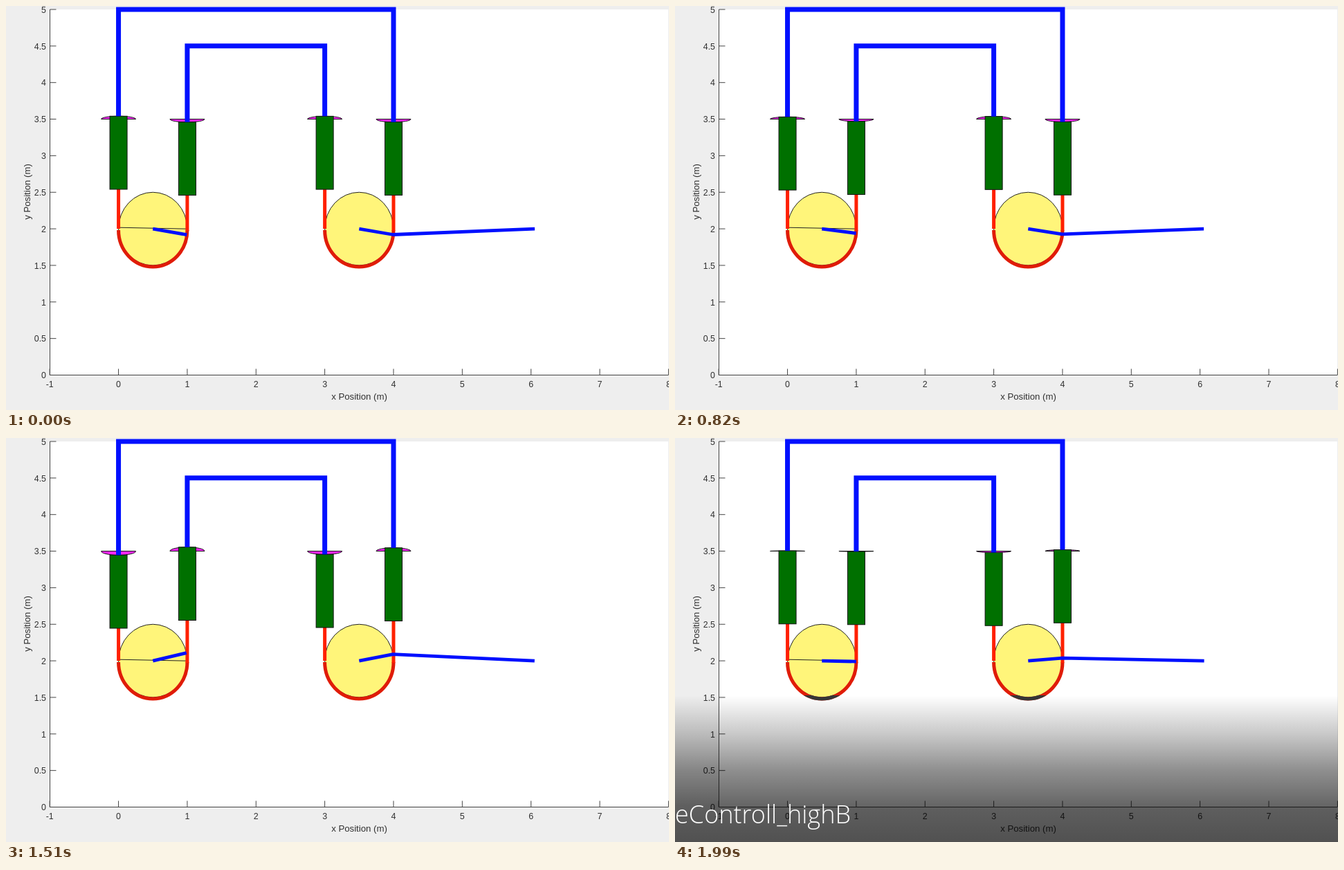
Recreate the animation shown at these times as an HTML page. Size 958x584 px, loop 2.65 s.

```html
<!DOCTYPE html>
<html lang="en">
<head>
<meta charset="utf-8">
<title>Coupled pulleys</title>
<style>
  html, body { margin: 0; width: 100%; height: 100%; overflow: hidden; background: #eee; }
  svg { display: block; width: 958px; height: 584px; }
  text { font-family: "Liberation Sans", Arial, sans-serif; fill: #303030; }
  .tick { font-size: 12.4px; }
  .label { font-size: 13.2px; text-anchor: middle; }
  .title { font: 300 36px "Open Sans", "Noto Sans", sans-serif; fill: #fff; text-anchor: end; }
</style>
</head>
<body>
<svg id="stage" viewBox="0 0 958 584" xmlns="http://www.w3.org/2000/svg">
  <defs>
    <linearGradient id="shade" x1="0" y1="0" x2="0" y2="1">
      <stop offset="0" stop-color="#000" stop-opacity="0"/>
      <stop offset=".27" stop-color="#000" stop-opacity=".22"/>
      <stop offset=".51" stop-color="#000" stop-opacity=".44"/>
      <stop offset=".75" stop-color="#000" stop-opacity=".6"/>
      <stop offset="1" stop-color="#000" stop-opacity=".66"/>
    </linearGradient>
    <clipPath id="lower"><rect y="372" width="958" height="212"/></clipPath>
  </defs>
  <rect width="958" height="584" fill="#eee"/>
  <rect x="63.5" y="5" width="893.5" height="528.5" fill="#fff"/>
  <g id="axes" stroke="#444" fill="none"></g>
  <g id="machine" fill="none"></g>
  <g id="overlay">
    <rect y="372" width="958" height="212" fill="url(#shade)"/>
    <text class="title" x="254" y="557">eControll_highB</text>
  </g>
  <g id="darkArcs" clip-path="url(#lower)" fill="none"></g>
</svg>
<script>
const LOOP = 2650, UX = 99.35, UY = 105.7;
const X = x => 63.2 + (x + 1) * UX;
const Y = y => 533.5 - y * UY;
const BLUE = '#0010ff', RED = '#ff2000';
const CABLE_Y = Y(3.5), AXLE_Y = Y(2), RX = UX / 2, RY = UY / 2;
const ROD = Math.sqrt(4.25);
const byId = id => document.getElementById(id);

function add(parent, tag, attrs, text) {
  const el = document.createElementNS('http://www.w3.org/2000/svg', tag);
  set(el, attrs);
  if (text !== undefined) el.textContent = text;
  parent.appendChild(el);
  return el;
}
function set(el, attrs) {
  for (const k in attrs) el.setAttribute(k, attrs[k]);
}

function buildAxes() {
  const axes = byId('axes');
  const label = (attrs, text) => add(axes, 'text', { stroke: 'none', ...attrs }, text);
  add(axes, 'path', { d: 'M63.5 5V533.5H957' });
  for (let x = -1; x <= 8; x++) {
    add(axes, 'path', { d: `M${X(x)} 533.5v-9` });
    label({ class: 'tick', x: X(x), y: 551, 'text-anchor': 'middle' }, x);
  }
  for (let y = 0; y <= 5; y += 0.5) {
    add(axes, 'path', { d: `M63.5 ${Y(y)}h9` });
    label({ class: 'tick', x: 58, y: Y(y) + 4.7, 'text-anchor': 'end' }, y);
  }
  label({ class: 'label', x: 510.5, y: 568.5 }, 'x Position (m)');
  label({ class: 'label', transform: 'translate(35 268.5) rotate(-90)' }, 'y Position (m)');
}

const machine = byId('machine');
const arc = (x, dx, y) => `M${x} ${y}A${RX} ${RY} 0 0 0 ${x + dx} ${y}`;

// One cable end: dome, sliding block and the cord below it.
function makePost(x) {
  const cx = X(x);
  return {
    cx,
    dome: add(machine, 'path', { fill: '#ff28ff', stroke: '#111', 'stroke-width': 1 }),
    cord: add(machine, 'path', { stroke: RED, 'stroke-width': 5 }),
    block: add(machine, 'rect', { x: cx - 12.5, width: 25, height: UY, fill: '#007000', stroke: '#111' })
  };
}
function makePulley(x, chord) {
  const cx = X(x + 0.5), left = X(x);
  add(machine, 'ellipse', { cx, cy: AXLE_Y, rx: RX, ry: RY, fill: '#fff57a', stroke: '#222' });
  if (chord) add(machine, 'path', { d: `M${left} 320.2L${left + UX} 322.2`, stroke: '#222' });
  add(machine, 'path', { d: arc(left, UX, AXLE_Y + 2), stroke: '#e01c08', 'stroke-width': 5 });
  add(byId('darkArcs'), 'path', { d: arc(left, UX, AXLE_Y + 2), stroke: '#363636', 'stroke-width': 5 });
  return { cx, posts: [makePost(x), makePost(x + 1)] };
}

buildAxes();
const pulleys = [makePulley(0, true), makePulley(3, false)];
const pipe = () => add(machine, 'path', { stroke: BLUE, 'stroke-width': 7 });
const pipes = [pipe(), pipe()];
const arm = () => add(machine, 'path', { stroke: BLUE, 'stroke-width': 4.8, 'stroke-linejoin': 'round' });
const arms = [arm(), arm()];

// Lift of each crank tip in pixels, at a few moments.
const TIMES = [0, 250, 600, 1090, 1510, 1650];
const LIFTS = [
  [-8.6, 26, -8, 3.5, 11.5, -1],
  [-8.4, 22, -7.6, -1, 9.5, 4]
];

// Smooth curve through the given moments.
function curve(values, t) {
  const last = TIMES.length - 1;
  if (t >= TIMES[last]) return values[last];
  const i = TIMES.findIndex(k => k > t) - 1;
  const slope = k => k === 0 || k === last ? 0
    : (values[k + 1] - values[k - 1]) / (TIMES[k + 1] - TIMES[k - 1]);
  const span = TIMES[i + 1] - TIMES[i], s = (t - TIMES[i]) / span;
  const s2 = s * s, s3 = s2 * s;
  return values[i] * (2 * s3 - 3 * s2 + 1) + values[i + 1] * (3 * s2 - 2 * s3)
    + span * (slope(i) * (s3 - 2 * s2 + s) + slope(i + 1) * (s3 - s2));
}

const STEPS = 30;
const stepTime = i => 70 * i - (i >= 4 ? 30 : 0) - (i >= 27 ? 10 : 0);

function posePulley(pulley, lift) {
  pulley.posts.forEach((post, side) => {
    const drop = (side ? -lift : lift) / 2, top = CABLE_Y + drop, { cx } = post;
    set(post.dome, { d: `M${cx - 25} ${CABLE_Y}A25 ${Math.max(Math.abs(drop), 0.01)} 0 0 ${drop > 0 ? 0 : 1} ${cx + 25} ${CABLE_Y}Z` });
    set(post.block, { y: top });
    set(post.cord, { d: `M${cx} ${top + UY}V${AXLE_Y + (side ? 3 : 0)}` });
    post.top = top;
  });
}

function draw(ms) {
  const now = ms % LOOP;
  let step = STEPS - 1;
  while (step > 0 && stepTime(step) > now) step--;
  const t = stepTime(step);

  pulleys.forEach((pulley, i) => {
    const lift = curve(LIFTS[i], t), sin = lift / RY;
    posePulley(pulley, lift);
    const tipX = pulley.cx + RX * Math.sqrt(1 - sin * sin);
    let d = `M${pulley.cx} ${AXLE_Y}L${tipX} ${AXLE_Y - lift}`;
    if (i === 1) d += `L${tipX + UX * Math.sqrt(ROD * ROD - (sin / 2) ** 2)} ${AXLE_Y}`;
    set(arms[i], { d });
  });

  const [a, b] = pulleys;
  [[0, 5], [1, 4.5]].forEach(([side, height], i) => {
    const from = a.posts[side], to = b.posts[1 - side];
    set(pipes[i], { d: `M${from.cx} ${from.top}V${Y(height)}H${to.cx}V${to.top}` });
  });

  set(byId('overlay'), { opacity: Math.max(0, (step - 24) / 5) });
  set(byId('darkArcs'), { opacity: step === STEPS - 1 ? 1 : 0 });
}

const start = performance.now();
function tick() {
  draw(performance.now() - start);
  requestAnimationFrame(tick);
}
tick();
</script>
</body>
</html>
```
